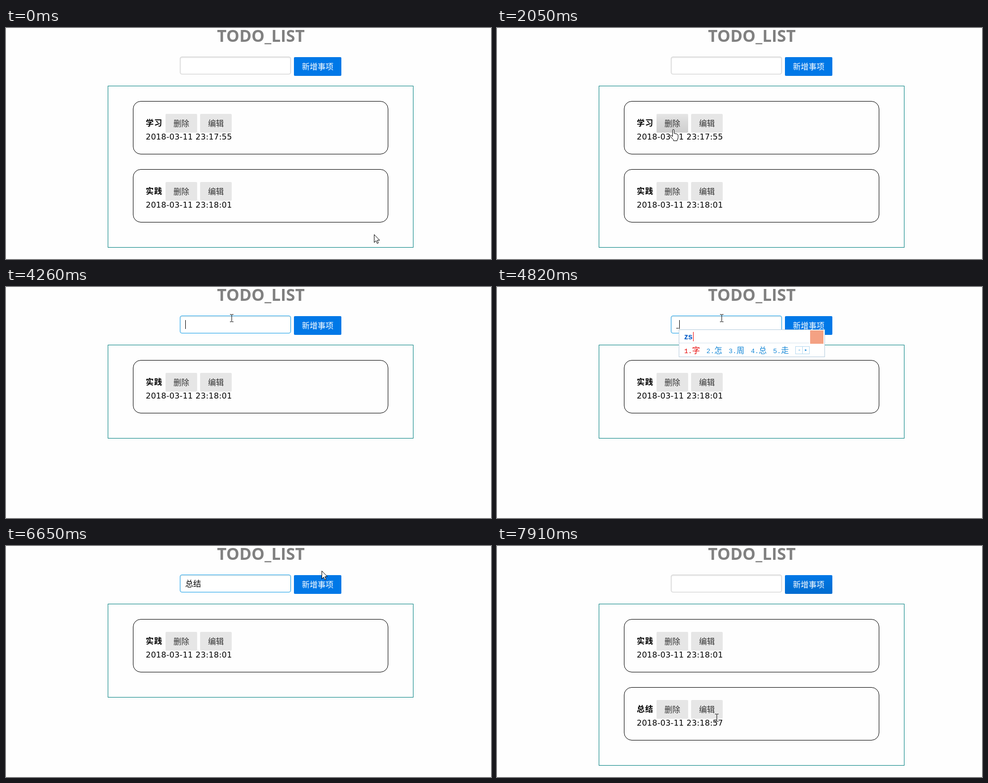
Recreate the animation shown at these times as an HTML page. Size 982 px wide and 468 px high, loop 8000 ms.

```html
<!DOCTYPE html>
<html lang="zh-CN">
<head>
<meta charset="utf-8">
<title>TODO_LIST</title>
<style>
html, body { margin: 0; width: 100%; height: 100%; overflow: hidden; background: #fefefe; }
body { position: relative; font: 16px 'Noto Sans CJK SC', 'Noto Sans CJK JP', sans-serif; color: #000; white-space: pre; }
div, svg { position: absolute; box-sizing: border-box; }
h1 { position: absolute; margin: 0; left: 206px; top: 0; width: 620px; text-align: center;
  font: bold 33.3px/30px 'Open Sans', sans-serif; color: #808080; }
#field { left: 352px; top: 58px; width: 225px; height: 36px; padding-left: 10px; line-height: 33px;
  border: 1px solid #ccc; border-radius: 4px; box-shadow: inset 0 1px 3px #ddd; background: #fff; }
#field.focus { border-color: #129fea; }
#caret { top: 67px; width: 1px; height: 18px; background: #000; }
#mark { left: 363px; top: 83px; width: 5px; height: 1px; background: #000; }
.btn { height: 38px; line-height: 36px; text-align: center; border-radius: 2px; background-color: #e6e6e6; color: #333; }
.btn.main { background-color: #0078e7; color: #fff; }
.btn.hot { background-image: linear-gradient(transparent, rgba(0,0,0,.05) 40%, rgba(0,0,0,.1)); }
#list { left: 206px; top: 117px; width: 619px; border: 1px solid #008080; }
.card { left: 257px; width: 517px; height: 108px; border: 1.2px solid #000; border-radius: 16px; }
.name { left: 25px; top: 32px; line-height: 20px; font-weight: bold; letter-spacing: 1px; }
.time { left: 25px; top: 62px; font: 16px/20px 'DejaVu Sans', sans-serif; letter-spacing: .25px; }
#ime { left: 368px; top: 86px; height: 56px; padding: 0 31px 0 10px; border: 1px solid #b4cbdc; background: #fff; }
#typed { left: 10px; top: 4px; padding-right: 1px; border-right: 1px solid #e00; color: #0a5fc8;
  font: bold 16px/19px 'Liberation Sans', Arial, sans-serif; }
#rule { left: 0; right: 31px; top: 26px; height: 1px; background: #d5e3ec; }
#logo { right: 2px; top: 1px; width: 27px; height: 27px; background: #f4a183; }
#row { display: flex; margin-top: 27px; height: 27px; line-height: 26px; color: #1a8ad8; }
#row span { margin-right: 13px; }
#row span:first-child { color: #e60000; }
#row i { font: 13.33px 'Liberation Mono', monospace; }
#row b { box-sizing: border-box; width: 15px; height: 16px; margin: 6px -1px 0 0; border: 1px solid #b5d9f0;
  font: 8px/13px 'DejaVu Sans', sans-serif; text-align: center; color: #1a8ad8; }
#row b:first-of-type { color: #a8d2ee; }
#pointer { left: 0; top: 0; width: 1px; height: 1px; overflow: visible; }
</style>
</head>
<body>
<h1>TODO_LIST</h1>
<div id="field"></div>
<div id="caret"></div>
<div id="mark"></div>
<div id="list"></div>
<div id="ime"><div id="typed"></div><div id="rule"></div><div id="logo"></div><section id="row"></section></div>
<svg id="pointer"><path id="shape" fill="#fff" stroke="#000"/></svg>
<script>
const $ = id => document.getElementById(id);
const LOOP = 8000, DELETED = 3260, FOCUSED = 3890, COMMITTED = 5840, BLURRED = 7100, ADDED = 7190;

const items = [
  ['学习', '2018-03-11 23:17:55'],
  ['实践', '2018-03-11 23:18:01'],
  ['总结', '2018-03-11 23:18:57']
];

// Pointer moves: start, time of last step, steps, evenly timed points
const moves = [
  [500, 1040, 7, [[745,418], [551,239]]],
  [1320, 2050, 9, [[551,239], [527,246], [430,222], [357,205]]],
  [3440, 3890, 6, [[357,205], [380,140], [430,75], [457,63]]],
  [4260, 4350, 2, [[457,63], [457,63], [455,63]]],
  [6300, 6920, 8, [[455,63], [470,63], [500,60], [550,56], [600,52], [639,50], [641,80], [638,95], [637,69]]],
  [7460, 7910, 6, [[637,69], [620,150], [590,230], [545,310], [495,370], [460,395], [445,348]]]
];

// Input method states: time, keys, candidates
const typing = [
  [4350, 'z', '在 这 中 再 做'],
  [4820, 'zs', '字 怎 周 总 走'],
  [5280, "zs'j", '总结 直接 最近 中间 之间'],
  [5470, "zs'jx", '总结 宗杰 宗介 总 综']
];

const shapes = {
  arrow: 'M.5.5V16.5L4.2 13 6.5 18.5 9 17.4 6.7 12H11.5Z',
  hand: 'M-1.5 15V2.2a1.6 1.6 0 0 1 3.2 0V8.5l5 1q3 .6 3 3.5v3.5q0 3-2 5v2H.5v-2L-5 16q-2-2.5-.5-3.6 1.5-1 4 2.6Z',
  beam: 'M-3.5-7.5h3m1 0h3M0-7V7M-3.5 7.5h3m1 0h3'
};

const buttons = [];
function addButton(x, y, w, text, card) {
  const el = document.createElement('div');
  el.className = card === undefined ? 'btn main' : 'btn';
  el.textContent = text;
  el.style.cssText = `left:${x}px;top:${y}px;width:${w}px`;
  document.body.insertBefore(el, $('ime'));
  buttons.push({ el, x, y, w, card });
}

const cards = [0, 1].map(i => {
  const el = document.createElement('div'), top = 148 + 138 * i;
  el.className = 'card';
  el.style.top = top + 'px';
  el.innerHTML = '<div class="name"></div><div class="time"></div>';
  document.body.insertBefore(el, $('ime'));
  addButton(323, top + 26, 64, '删除', i);
  addButton(393, top + 26, 64, '编辑', i);
  return el;
});
addButton(583, 59, 96, '新增事项');

const show = (el, on) => el.style.visibility = on ? 'visible' : 'hidden';
const inside = ([px, py], x, y, w, h) => px >= x && px < x + w && py >= y && py < y + h;

function pointerAt(t) {
  const move = moves.filter(m => t >= m[0]).pop();
  if (!move) return moves[0][3][0];
  const [start, end, steps, pts] = move;
  const step = Math.min(steps, 1 + Math.floor((t - start + 6) * (steps - 1) / (end - start)));
  const u = step / steps * (pts.length - 1), i = Math.min(Math.floor(u + 1e-9), pts.length - 2);
  return pts[i].map((a, k) => a + (pts[i + 1][k] - a) * (u - i));
}

function drawCards(t) {
  const shown = t < DELETED ? items.slice(0, 2) : t < ADDED ? [items[1]] : items.slice(1);
  cards.forEach((el, i) => {
    show(el, shown[i]);
    if (shown[i]) shown[i].forEach((text, k) => el.children[k].textContent = text);
  });
  $('list').style.height = 52 + 138 * shown.length + 'px';
  return shown.length;
}

function drawPointer(t, count) {
  const p = pointerAt(t);
  const onText = inside(p, 352, 58, 225, 36) ||
    cards.some((c, i) => i < count && inside(p, 283, 208 + 138 * i, 175, 24));
  let kind = onText ? 'beam' : 'arrow';
  for (const b of buttons) {
    const live = b.card === undefined || b.card < count;
    const hover = live && !onText && inside(p, b.x, b.y, b.w, 38);
    if (hover) kind = 'hand';
    show(b.el, live);
    b.el.classList.toggle('hot', hover || b.card === undefined && t >= BLURRED);
  }
  $('shape').setAttribute('d', shapes[kind]);
  $('shape').setAttribute('transform', `translate(${p.map(Math.round)})`);
}

let lastState;
function drawInput(t) {
  const focus = t >= FOCUSED && t < BLURRED;
  const state = t < COMMITTED && typing.filter(s => t >= s[0]).pop();
  const done = t >= COMMITTED && t < ADDED;
  $('field').className = focus ? 'focus' : '';
  $('field').textContent = done ? items[2][0] : '';
  show($('caret'), focus && !(t >= 6300 && t < 6830));
  $('caret').style.left = (done ? 395 : state ? 369 : 363) + 'px';
  show($('mark'), state);
  show($('ime'), state);
  if (state && state !== lastState) {
    $('typed').textContent = state[1];
    $('row').innerHTML = state[2].split(' ').map((c, i) => `<span><i>${i + 1}.</i>${c}</span>`).join('') +
      '<b>◂</b><b>▸</b>';
  }
  lastState = state;
}

function frame(now) {
  const t = now % LOOP;
  drawPointer(t, drawCards(t));
  drawInput(t);
  requestAnimationFrame(frame);
}
requestAnimationFrame(frame);
</script>
</body>
</html>
```
